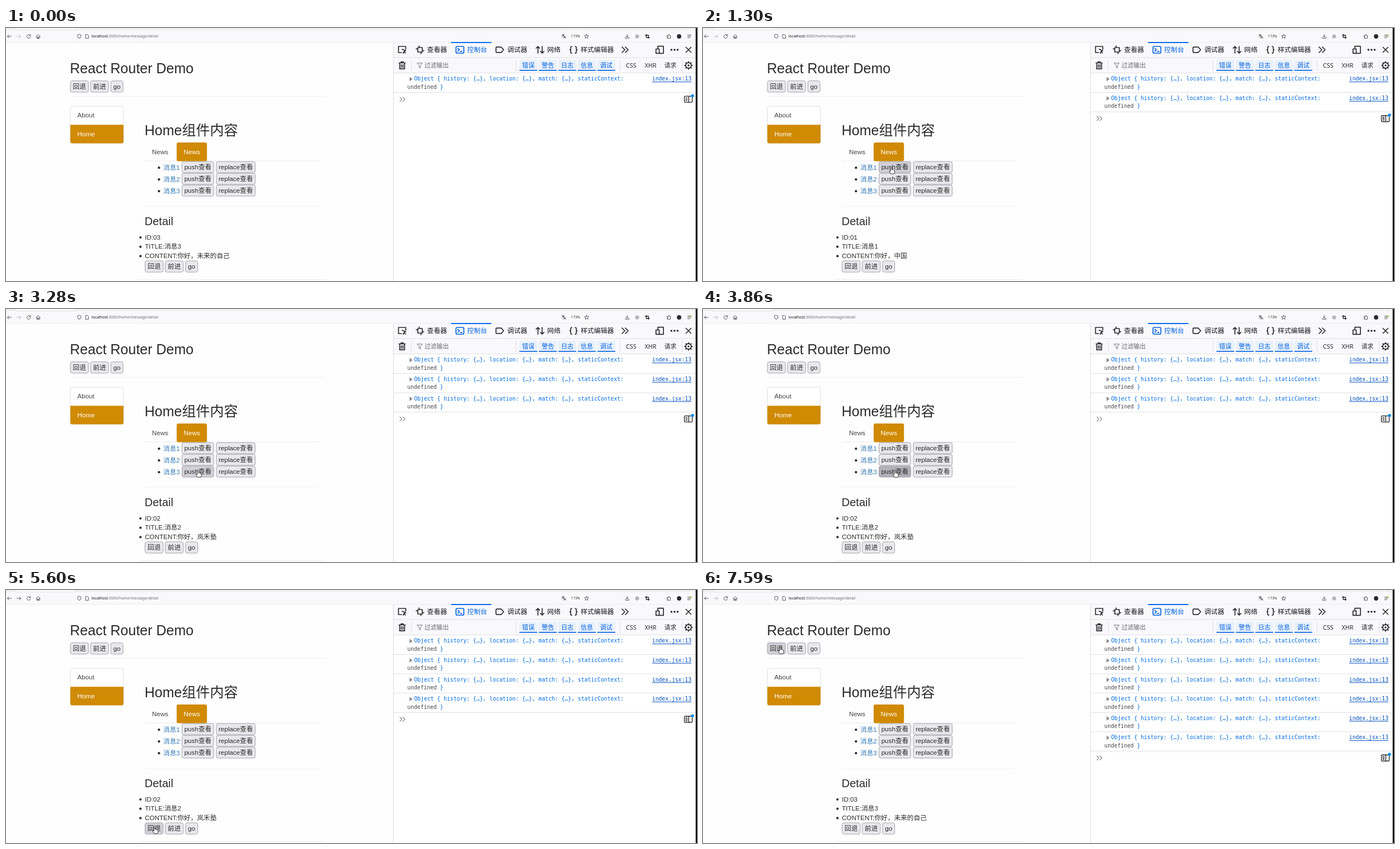
An HTML page for the animation above (8000 ms loop, 1235x453 px).

```html
<!DOCTYPE html>
<html lang="zh-CN">
<head>
<meta charset="utf-8">
<title>React Router Demo</title>
<style>
html, body { margin: 0; width: 100%; height: 100%; overflow: hidden; background: #fefefe; }
svg { display: block; width: 100%; height: 100%; }
text { white-space: pre; font-family: 'Liberation Sans', 'Noto Sans CJK SC', 'Noto Sans CJK', sans-serif; fill: #2b2b2b; }
.ui { font-family: 'Noto Sans', 'Noto Sans CJK SC', 'Noto Sans CJK', sans-serif; }
.cjk { font-family: 'Noto Sans CJK SC', 'Noto Sans CJK', sans-serif; }
.mono { font-family: 'DejaVu Sans Mono', monospace; font-size: 9.73px; }
.ic { fill: none; stroke: #2b2b30; stroke-width: 1.7; stroke-linecap: round; stroke-linejoin: round; }
.sm { fill: none; stroke: #4a4a50; stroke-width: .9; stroke-linecap: round; stroke-linejoin: round; }
</style>
</head>
<body>
<svg id="stage" viewBox="0 0 1235 453" preserveAspectRatio="none"></svg>
<script>
const LOOP = 8000, BODY = 11.67, ROW = 34.62;
const BLUE = '#0060df', GOLD = '#d08a04', CODE = '#006bdf', LINK = '#004fbd';

const text = (x, y, size, str, attrs = '') =>
  `<text x="${x}" y="${y}" font-size="${size}" ${attrs}>${str}</text>`;
const rect = (x, y, w, h, fill, attrs = '') =>
  `<rect x="${x}" y="${y}" width="${w}" height="${h}" fill="${fill}" ${attrs}/>`;
const line = (x1, y1, x2, y2, color) =>
  `<path d="M${x1} ${y1}L${x2} ${y2}" stroke="${color}" fill="none"/>`;
const dot = (x, y, r, fill, attrs = '') =>
  `<circle cx="${x}" cy="${y}" r="${r}" fill="${fill}" ${attrs}/>`;
const icon = (x, y, d, cls = 'ic', attrs = '') =>
  `<path class="${cls}" transform="translate(${x} ${y})" d="${d}" ${attrs}/>`;

// x, y, width, height, label
const buttons = [];
const navRow = (x, y) => [[0, 33, '回退'], [36, 33, '前进'], [72.3, 22.5, 'go']]
  .forEach(([dx, w, label]) => buttons.push([x + dx, y, w, 21, label]));
navRow(114.7, 94.2);
navRow(248.2, 416.5);
for (let i = 0; i < 3; i++) {
  const y = 238.8 + i * 21;
  buttons.push([314.2, y, 57.5, 20.6, 'push查看'], [375.5, y, 70.3, 20.6, 'replace查看']);
}

function browserBar() {
  return rect(0, 0, 1235, 25, '#f9f9fb') + rect(0, 0, 1235, 4, '#f0f0f4') +
    rect(17, 0, 107, 3.5, '#fff', 'stroke="#d4d4da" stroke-width=".7"') +
    line(0, 25.5, 1235, 25.5, '#ececf0') +
    icon(6, 15, 'M3.5 0H-3.5M-.8 -2.8L-3.5 0L-.8 2.8', 'sm') +
    icon(23, 15, 'M-3.5 0H3.5M.8 -2.8L3.5 0L.8 2.8', 'sm', 'id="forward"') +
    icon(40.5, 15, 'M2.6 -1.8A3.2 3.2 0 1 0 3.2 .6M3.3 -3.4V-1.3H1.2', 'sm') +
    icon(57.5, 15, 'M-3.5 .2L0 -3.3L3.5 .2M-2.6 -.5V3.3H2.6V-.5M-.8 3.2V1H.8V3.2', 'sm') +
    icon(131, 15, 'M0 -3.6L3 -2.5V0Q2.7 2.5 0 3.6Q-2.7 2.5 -3 0V-2.5Z', 'sm') +
    icon(145, 15, 'M-2.3 -3.4H.8L2.4 -1.8V3.4H-2.3Z', 'sm') +
    text(153, 17.4, 6.85, '<tspan fill="#15141a">localhost</tspan>:3000/home/message/detail', 'class="ui" style="fill:#6c6c73"') +
    icon(997, 15, 'M-3.5 -2.6H1M-1.2 -3.6V-2.6M.2 -2.6Q-.8 .2 -3.3 1.2M-2.3 -2.4Q-1.5 0 .3 .7M-.3 3.4L1.7 -.8L3.7 3.4M.5 2H3', 'sm') +
    rect(1008, 9.8, 20, 10.4, '#fff', 'rx="3"') +
    text(1018, 17.3, 6.4, '173%', 'class="ui" text-anchor="middle"') +
    icon(1037.7, 15, 'M0 -3.8L1.1 -1.3L3.8 -1.1L1.8 .7L2.4 3.4L0 2L-2.4 3.4L-1.8 .7L-3.8 -1.1L-1.1 -1.3Z', 'sm') +
    icon(1110.3, 15, 'M0 -3.4V1.2M-2 -.7L0 1.2L2 -.7M-3.2 1.6V3.3H3.2V1.6', 'sm') +
    dot(1128, 15, 3.6, '#b6b6ba') +
    icon(1146.3, 15, 'M-2 -3.6V2H3.6M-3.6 -2H2V3.6', 'sm', 'style="stroke:#222;stroke-width:1.3"') +
    icon(1184.5, 15, 'M-2.8 -1.6H-.8V-3Q.2 -4.2 1.2 -3V-1.6H3V3.3H-2.8V1.6H-1.5V0H-2.8Z', 'sm') +
    dot(1203, 15, 3.9, '#2a2a2e') +
    icon(1221.3, 15, 'M-3 -2.4H3M-3 0H3M-3 2.4H1', 'sm') +
    dot(1223.8, 12.8, 1.7, '#9ccf5a', 'id="badge"');
}

function page() {
  let s = text(114.3, 80.8, 25, 'React Router Demo') +
    line(115, 122.5, 571, 122.5, '#f0f0f0') +
    rect(115, 140, 95, 66, '#fff', 'rx="3.4" stroke="#ddd"') +
    `<path d="M115 173.3H210V203.5Q210 206.5 207 206.5H118Q115 206.5 115 203.5Z" fill="${GOLD}"/>` +
    text(127.6, 160.4, BODY, 'About', 'style="fill:#444"') +
    text(127.6, 193.8, BODY, 'Home', 'style="fill:#fff"') +
    line(236.5, 140, 236.5, 450, '#fafafa') + line(571.5, 140, 571.5, 450, '#fbfbfb') +
    line(236.5, 450.5, 571.5, 450.5, '#eee') +
    text(247.8, 191.8, 25, 'Home组件内容') +
    line(248, 238, 560, 238, '#e9e9e9') +
    rect(305, 205, 54.2, 33.4, GOLD, 'rx="3.2"') +
    text(261, 226, BODY, 'News', 'style="fill:#444"') +
    text(317.6, 226, BODY, 'News', 'style="fill:#fff"') +
    line(248, 319, 560, 319, '#f2f2f2') +
    text(247.8, 353.3, 20, 'Detail');
  for (let i = 0; i < 3; i++) {
    s += dot(273.4, 250.2 + i * 21, 2.1, '#2b2b2b') +
      text(281, 253.8 + i * 21, BODY, '消息' + (i + 1), 'style="fill:#337ab7"') +
      dot(240.3, 375 + i * 16.7, 2.1, '#2b2b2b') +
      text(248.2, 378.7 + i * 16.7, BODY, '', `id="detail${i}"`);
  }
  buttons.forEach(([x, y, w, h, label], i) => {
    s += rect(x + .4, y + .4, w - .8, h - .8, '#e9e9ed', `rx="3" stroke="#9a9aa6" stroke-width=".9" id="btn${i}"`) +
      text(x + w / 2, y + h / 2 + 4.2, BODY, label, 'text-anchor="middle"');
  });
  return s;
}

function tools() {
  const tabs = [[752.6, '查看器'], [824.3, '控制台'], [896, '调试器'], [967.3, '网络'], [1027.2, '样式编辑器']];
  let s = rect(692, 26, 541, 54, '#f9f9fb') + rect(692, 80, 541, 373, '#fff') +
    line(692.5, 26, 692.5, 453, '#dcdce2') + line(692, 53, 1233, 53, '#e0e0e6') + line(692, 80.5, 1233, 80.5, '#e0e0e6') +
    rect(795.5, 25, 72, 2, '#0a6cf0');
  tabs.forEach(([x, label], i) => {
    s += text(x, 43.4, 11.85, label, `class="cjk" font-weight="500" style="fill:${i == 1 ? BLUE : '#18181c'}"`);
  });
  s += icon(708, 39, 'M6.5 -1V-6H-6.5V5H-1M0 -1L6.5 1.6L3.5 3L5.8 5.8M3.5 3L2 6Z') +
    icon(740, 39, 'M-4 -4H4V4H-4ZM-1.6 -7V-4M-6.8 -1.6H-4M1.6 7V4M6.8 1.6H4') +
    icon(811.3, 39, 'M-5 -6H5Q7 -6 7 -4V4Q7 6 5 6H-5Q-7 6 -7 4V-4Q-7 -6 -5 -6ZM-3.6 -2.7L-.8 0L-3.6 2.7M1 2.8H3.6', 'ic', `style="stroke:${BLUE}"`) +
    icon(882.5, 39, 'M-5.5 -4.8H2.5L7 0L2.5 4.8H-5.5Q-6.8 4.8 -6.8 3.5V-3.5Q-6.8 -4.8 -5.5 -4.8Z') +
    icon(954.5, 39, 'M-3.8 6V-6M-7 -2.8L-3.8 -6L-.8 -2.8M3.8 -6V6M.8 2.8L3.8 6L7 2.8') +
    icon(1014.3, 39, 'M-3 -6Q-5 -6 -5 -4V-2Q-5 0 -6.6 0Q-5 0 -5 2V4Q-5 6 -3 6M3 -6Q5 -6 5 -4V-2Q5 0 6.6 0Q5 0 5 2V4Q5 6 3 6') +
    icon(1106.5, 39, 'M-5.5 -5L-.5 0L-5.5 5M.5 -5L5.5 0L.5 5') +
    icon(1168.5, 39, 'M-3.5 -2.5V-6.3H6.5V6.3H0M-6.8 -1.5H-1V6.3H-6.8Z') +
    [-5.5, 0, 5.5].map(d => dot(1194.8 + d, 39, 1.8, '#2b2b30')).join('') +
    icon(1219.8, 39, 'M-4.5 -4.5L4.5 4.5M4.5 -4.5L-4.5 4.5') +
    icon(708, 67, 'M-5.6 -4.5H5.6M-2 -4.6V-6.4H2V-4.6M-4.4 -4.4V6.2H4.4V-4.4M-1.5 -1.5V3.5M1.5 -1.5V3.5') +
    icon(739.5, 67, 'M-4.5 -4.2H4.5L1.2 .2V4.6L-1.2 3.2V.2Z', 'sm', 'style="stroke:#66666c"') +
    text(748, 71, 10.8, '过滤输出', 'class="cjk" style="fill:#6a6a70"') +
    [724.5, 911.5, 1097.5, 1208.5].map(x => line(x, 57, x, 77, '#e0e0e6')).join('');
  ['错误', '警告', '日志', '信息', '调试'].forEach((label, i) => {
    const x = 917.6 + i * 34.8;
    s += rect(x, 57, 32, 19.5, '#e9f1fb', 'rx="2"') + rect(x, 75, 32, 1.6, BLUE) +
      text(x + 16, 70.9, 11, label, `class="cjk" text-anchor="middle" font-weight="500" style="fill:${BLUE}"`);
  });
  [[1117.4, 'CSS'], [1152, 'XHR'], [1187.2, '请求']].forEach(([x, label]) => {
    s += text(x, 70.8, 10.8, label, 'class="ui" text-anchor="middle" style="fill:#2b2b30"');
  });
  s += dot(1219.8, 67, 5, 'none', 'stroke="#2b2b30" stroke-width="1.9"');
  for (let i = 0; i < 8; i++)
    s += `<path class="ic" d="M0 -5V-7" transform="translate(1219.8 67) rotate(${i * 45})"/>`;
  return s + dot(1219.8, 67, 1.7, '#2b2b30');
}

function logRow(i) {
  return `<g id="row${i}" transform="translate(0 ${i * ROW})">` +
    '<path d="M721.3 87.6V95.4L726.6 91.5Z" fill="#8a8a90"/>' +
    `<text class="mono" x="729.5" y="94.4" style="fill:${CODE}">Object { history: {…}, location: {…}, match: {…}, staticContext:</text>` +
    `<text class="mono" x="717.3" y="108.8" style="fill:#48484e">undefined <tspan fill="${CODE}">}</tspan></text>` +
    `<text class="mono" x="1154.8" y="94.4" style="fill:${LINK}">index.jsx:13</text>` +
    line(1155, 96.5, 1225, 96.5, LINK) + line(693, 115.4, 1233, 115.4, '#e0e0e6') + '</g>';
}

const prompt = '<g id="prompt">' +
  icon(708.5, 93, 'M-4.5 -3.7L-.8 0L-4.5 3.7M.8 -3.7L4.5 0L.8 3.7', 'sm', 'style="stroke:#85858b;stroke-width:1.2"') +
  icon(1219.5, 93, 'M-5.5 -5.5H5.5Q7 -5.5 7 -4V4Q7 5.5 5.5 5.5H-5.5Q-7 5.5 -7 4V-4Q-7 -5.5 -5.5 -5.5ZM.8 -5.5V5.5M-4.5 -2.5H-2M-4.5 0H-2M-4.5 2.5H-2', 'ic', 'style="stroke-width:1.4"') +
  dot(1227, 86.6, 2.7, '#0090ed') + '</g>';

const pointer = dot(0, 0, 6, '#f0e000', 'id="glow" opacity=".65"') +
  '<g id="cursor" fill="#fff" stroke="#222" stroke-width=".9" stroke-linejoin="round">' +
  '<path id="hand" d="M-2.6 -5.3a1.1 1.1 0 0 1 2.2 0V-1.3q2 -.4 3 .4q1.8 .2 2 1.8V3q0 1.7 -1.1 3.2H-2L-4.8 2q-.6 -1.3 .6 -1.5q.8 0 1.6 1Z"/>' +
  '<path id="arrow" transform="translate(-1.5 -6)" d="M0 0V11L2.6 8.6L4.3 12.4L6 11.6L4.3 8H7.8Z"/></g>';

const svg = document.getElementById('stage');
svg.innerHTML = rect(0, 0, 1235, 453, '#fefefe') + browserBar() + page() + tools() +
  [0, 1, 2, 3, 4, 5].map(logRow).join('') + prompt + rect(1232.7, 0, 2.3, 453, '#000') + pointer;

const $ = id => document.getElementById(id);
const show = (id, on) => $(id).setAttribute('display', on ? 'inline' : 'none');
const within = (t, spans) => spans.some(([a, b]) => t >= a && t < b);

const details = { 1: '中国', 2: '岚禾塾', 3: '未来的自己' };
const views = [[0, 3], [1220, 1], [2715, 2], [3945, 3], [5600, 2], [6530, 3]];
const logTimes = [0, 1300, 2795, 4030, 5680, 6610];
const glows = [[1050, 1140], [2550, 2630], [3780, 3860], [5430, 5600], [6360, 6530]];
const presses = [[1140, 1220], [2630, 2715], [3860, 3945], [5430, 5600], [6360, 6530]];
// start, end, steps, goal x, goal y
const moves = [
  [80, 800, 10, 338, 255], [1980, 2380, 6, 343.5, 273], [2880, 3280, 6, 344.5, 295],
  [4110, 4440, 5, 276.5, 424], [4520, 4930, 6, 267, 430], [5760, 6030, 4, 294.5, 435],
  [6860, 7590, 10, 139.5, 108]
];

function cursorAt(t) {
  let x = 1163, y = 447;
  for (const [a, b, n, gx, gy] of moves) {
    if (t < a) break;
    const step = Math.min(n, Math.floor((t - a) / (b - a) * (n - 1) + .001) + 1);
    const p = step / n, e = p * p * (3 - 2 * p);
    x += (gx - x) * e;
    y += (gy - y) * e;
  }
  return [x, y];
}

function draw(t) {
  const [x, y] = cursorAt(t), hx = x - 1.5, hy = y - 6, visible = t >= 80;
  const down = within(t, presses);
  let over = false;
  buttons.forEach(([bx, by, w, h], i) => {
    const hit = visible && hx >= bx && hx <= bx + w && hy >= by && hy <= by + h;
    over = over || hit;
    $('btn' + i).setAttribute('fill', !hit ? '#e9e9ed' : down ? '#b1b1b9' : '#d0d0d7');
  });
  show('cursor', visible);
  show('hand', over);
  show('arrow', !over);
  $('cursor').setAttribute('transform', `translate(${x} ${y})`);
  show('glow', within(t, glows));
  $('glow').setAttribute('transform', `translate(${hx + .5} ${hy + 1.5})`);

  const id = views.filter(v => t >= v[0]).pop()[1];
  ['ID:0' + id, 'TITLE:消息' + id, 'CONTENT:你好\uff0c' + details[id]]
    .forEach((s, i) => { $('detail' + i).textContent = s; });

  const count = logTimes.filter(a => t >= a).length;
  logTimes.forEach((_, i) => show('row' + i, i < count));
  $('prompt').setAttribute('transform', `translate(0 ${count * ROW})`);
  $('forward').style.stroke = within(t, [[5600, 6530]]) ? '#4a4a50' : '#b4b4ba';
  show('badge', t >= 1220);
}

const begin = performance.now();
function tick() {
  draw((performance.now() - begin) % LOOP);
  requestAnimationFrame(tick);
}
draw(0);
requestAnimationFrame(tick);
</script>
</body>
</html>
```
